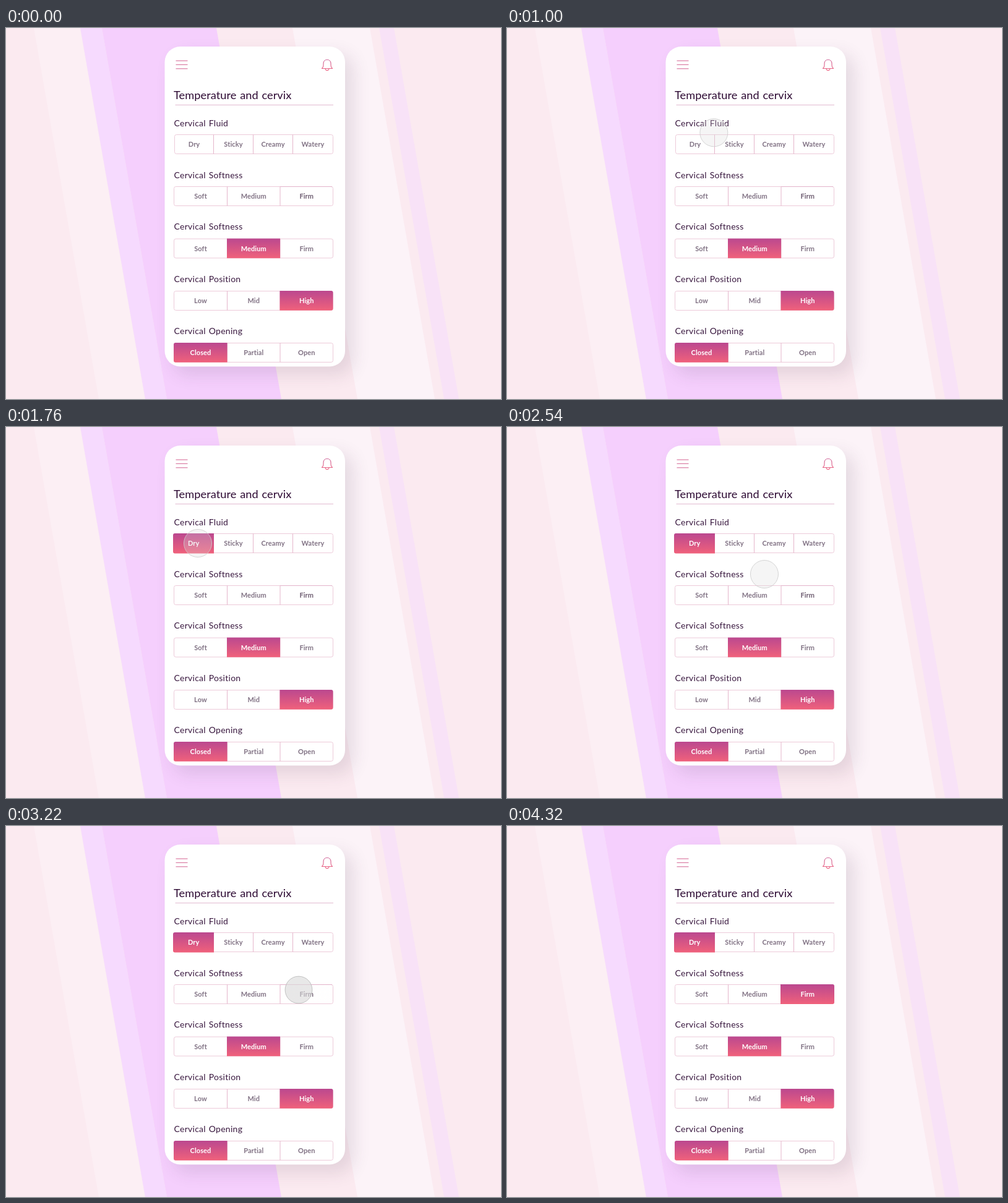
An HTML page with a canvas for the animation above (6.4 s loop, 800 by 600 pixels).

```html
<!DOCTYPE html>
<html lang="en">
<head>
<meta charset="utf-8">
<title>Temperature and cervix</title>
<style>
html, body { margin: 0; width: 100%; height: 100%; overflow: hidden; background: #fbeaf0; }
canvas { display: block; width: 800px; height: 600px; }
</style>
</head>
<body>
<canvas id="stage" width="800" height="600"></canvas>
<script>
const ctx = document.getElementById('stage').getContext('2d');
const LOOP = 6400;
const TAP = 240;
const DRY_TAP = 1520;
const FIRM_TAP = 3220;
const FONT = 'Lato, "Open Sans", sans-serif';

const STRIPES = [
  [45, 120, '#fceff4'],
  [120, 155, '#f6dafe'],
  [155, 340, '#f5cffd'],
  [463, 588, '#fcf3f8'],
  [603, 627, '#f8e2f7']
];

const ROWS = [
  { title: 'Cervical Fluid', baseline: 158.5, top: 172.5, edges: [272.5, 335.5, 399.5, 463.5, 528.5], options: ['Dry', 'Sticky', 'Creamy', 'Watery'] },
  { title: 'Cervical Softness', baseline: 242.5, top: 256.5, options: ['Soft', 'Medium', 'Firm'] },
  { title: 'Cervical Softness', baseline: 326, top: 341, options: ['Soft', 'Medium', 'Firm'], selected: 1 },
  { title: 'Cervical Position', baseline: 411, top: 425.5, options: ['Low', 'Mid', 'High'], selected: 2 },
  { title: 'Cervical Opening', baseline: 494.5, top: 509.5, options: ['Closed', 'Partial', 'Open'], selected: 0 }
];
const THIRDS = [271.5, 357.5, 443, 528.5];
const ROW_HEIGHT = 31;

const clamp = v => Math.min(1, Math.max(0, v));
const mix = (a, b, k) => a + (b - a) * k;
const easeOut = (k, power) => 1 - Math.pow(1 - clamp(k), power);

function roundRect(x, y, w, h, radii) {
  ctx.beginPath();
  ctx.roundRect(x, y, w, h, radii);
}

function line(x1, y1, x2, y2, color, width = 1) {
  ctx.strokeStyle = color;
  ctx.lineWidth = width;
  ctx.beginPath();
  ctx.moveTo(x1, y1);
  ctx.lineTo(x2, y2);
  ctx.stroke();
}

function label(text, x, y, font, color, spacing = 0, align = 'left') {
  ctx.font = `${font} ${FONT}`;
  ctx.letterSpacing = `${spacing}px`;
  ctx.wordSpacing = '1px';
  ctx.textAlign = align;
  ctx.fillStyle = color;
  ctx.fillText(text, x, y);
}

function drawBackground() {
  ctx.fillStyle = '#fbeaf0';
  ctx.fillRect(0, 0, 800, 600);
  for (const [left, right, color] of STRIPES) {
    ctx.fillStyle = color;
    ctx.beginPath();
    ctx.moveTo(left, 0);
    ctx.lineTo(right, 0);
    ctx.lineTo(right + 105, 600);
    ctx.lineTo(left + 105, 600);
    ctx.fill();
  }
}

function drawPhone() {
  ctx.save();
  ctx.shadowColor = 'rgba(70, 45, 75, 0.13)';
  ctx.shadowBlur = 28;
  ctx.shadowOffsetX = 13;
  ctx.shadowOffsetY = 13;
  ctx.fillStyle = '#fff';
  roundRect(256.5, 30, 291.5, 517.5, 25);
  ctx.fill();
  ctx.restore();
}

function drawHeader() {
  for (const y of [53, 59.3, 65.8]) line(274.5, y, 293.5, y, '#da7aa2', 1.2);

  const tint = ctx.createLinearGradient(0, 51, 0, 69);
  tint.addColorStop(0, '#cc5f95');
  tint.addColorStop(1, '#ef6c88');
  ctx.strokeStyle = tint;
  ctx.lineWidth = 1.15;
  ctx.lineJoin = 'round';
  ctx.beginPath();
  ctx.moveTo(510.5, 65.5);
  ctx.bezierCurveTo(513, 63, 513, 61.5, 513, 57.5);
  ctx.bezierCurveTo(513, 49.2, 525, 49.2, 525, 57.5);
  ctx.bezierCurveTo(525, 61.5, 525, 63, 527.5, 65.5);
  ctx.closePath();
  ctx.moveTo(516, 66);
  ctx.bezierCurveTo(516.5, 69.5, 521.5, 69.5, 522, 66);
  ctx.stroke();

  label('Temperature and cervix', 271, 115, '18.2px', '#2d0a33', 0.06);
  line(273.5, 124.5, 529, 124.5, '#e2bbd0');
}

function fillOption(left, right, top, height, radii, opacity) {
  const fill = ctx.createLinearGradient(0, top, 0, top + height);
  fill.addColorStop(0, '#bb488f');
  fill.addColorStop(1, '#f0617b');
  ctx.save();
  ctx.globalAlpha = opacity;
  ctx.fillStyle = fill;
  roundRect(left, top, right - left, height, radii);
  ctx.fill();
  ctx.restore();
}

function drawRow(row, index, dry, firm) {
  const edges = row.edges || THIRDS;
  const last = row.options.length - 1;
  const bottom = row.top + ROW_HEIGHT;
  label(row.title, 271.5, row.baseline, '14px', '#39183f', 0.27);

  ctx.strokeStyle = '#edcad9';
  ctx.lineWidth = 1;
  roundRect(edges[0], row.top, 528.5 - edges[0], ROW_HEIGHT, 3);
  ctx.stroke();
  for (const x of edges.slice(1, -1)) line(x, row.top, x, bottom, '#e5b5cb');
  if (index === 1) line(443, row.top, 527, row.top, '#e3b3ca');

  row.options.forEach((text, i) => {
    const left = edges[i], right = edges[i + 1];
    const center = (left + right) / 2;
    const radii = [i ? 0 : 3, i === last ? 3 : 0, i === last ? 3 : 0, i ? 0 : 3];
    const isDry = index === 0 && i === 0;
    const isFirm = index === 1 && i === 2;
    const opacity = isDry ? dry : isFirm ? firm : Number(row.selected === i);

    if (opacity < 1) {
      label(text, center, row.top + 19.5, 'bold 11px', isFirm ? '#6d5c70' : '#817284', 0.1, 'center');
    }
    if (opacity > 0) {
      // Tapped options are drawn slightly larger than preset ones
      if (isDry) fillOption(left - 2.5, right + 0.5, row.top - 0.5, 32.5, radii, opacity);
      else if (isFirm) fillOption(left - 1, right + 0.5, row.top - 0.5, 32, radii, opacity);
      else fillOption(left - 0.5, right, row.top - 0.5, 31.7, radii, 1);
      ctx.globalAlpha = opacity;
      label(text, isDry ? center - 0.8 : center, row.top + 19.5, 'bold 11px', '#fff', 0.1, 'center');
      ctx.globalAlpha = 1;
    }
  });
}

const DRY_POINT = { x: 310, y: 188 };
const FIRM_POINT = { x: 473, y: 265 };

// Pointer centre for a given time, or null while off stage
function pointerAt(t) {
  if (t < 380 || t >= 4320) return null;
  if (t < 1320) {
    const s = easeOut((t - 380) / 940, 2.35);
    const r = 1 - s;
    const along = (from, bend, to) => r * r * from + 2 * r * s * bend + s * s * to;
    return { x: along(719, 460, DRY_POINT.x), y: along(-20, 68, DRY_POINT.y) };
  }
  if (t < 4140) {
    const k = easeOut((t - 2300) / 680, 2.4);
    return { x: mix(DRY_POINT.x, FIRM_POINT.x, k), y: mix(DRY_POINT.y, FIRM_POINT.y, k) };
  }
  const k = easeOut((t - 4140) / 680, 2.4);
  return { x: mix(FIRM_POINT.x, 971, k), y: mix(FIRM_POINT.y, -323, k) };
}

function pressAt(t) {
  const strength = start => t < start ? 0 : 1 - clamp((t - start) / TAP);
  return Math.max(strength(DRY_TAP), strength(FIRM_TAP));
}

function drawPointer(t) {
  const p = pointerAt(t);
  if (!p) return;
  const press = pressAt(t);
  ctx.beginPath();
  ctx.arc(p.x, p.y, 22.5 - press * 0.6, 0, Math.PI * 2);
  ctx.fillStyle = `rgba(220, 220, 220, ${0.28 + press * 0.36})`;
  ctx.fill();
  const grey = Math.round(205 - press * 20);
  ctx.strokeStyle = `rgba(${grey}, ${grey}, ${grey}, 0.85)`;
  ctx.lineWidth = 1;
  ctx.stroke();
}

function render(t) {
  drawBackground();
  drawPhone();
  drawHeader();
  const dry = clamp((t - DRY_TAP) / TAP);
  const firm = clamp((t - FIRM_TAP) / TAP);
  ROWS.forEach((row, i) => drawRow(row, i, dry, firm));
  drawPointer(t);
}

const start = performance.now();
function tick() {
  render((performance.now() - start) % LOOP);
  requestAnimationFrame(tick);
}
tick();
</script>
</body>
</html>
```
